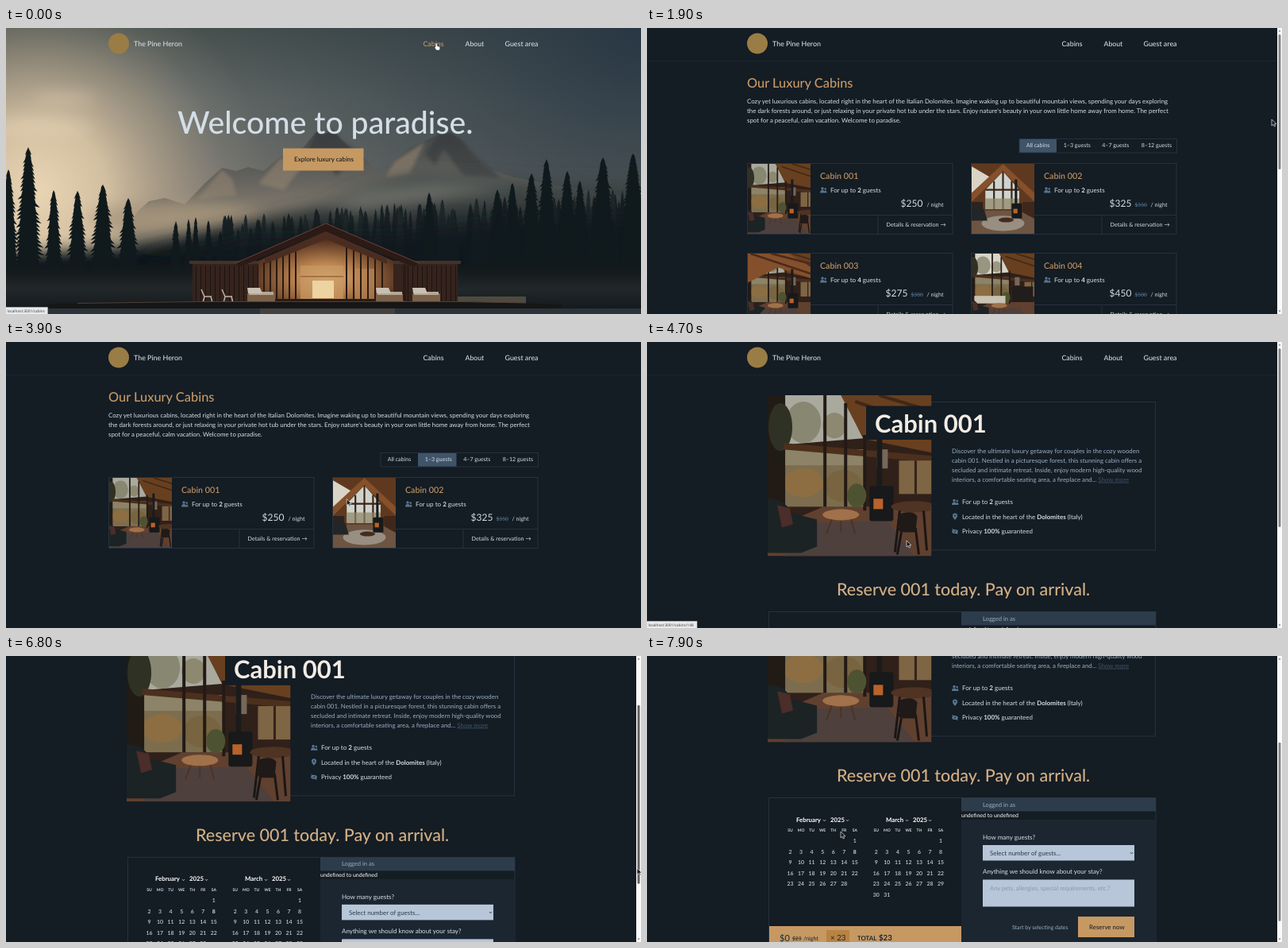
Recreate the animation shown at these times as an HTML page. Size 800 px wide and 360 px high, loop 8000 ms.

```html
<!DOCTYPE html>
<html lang="en">
<head>
<meta charset="utf-8">
<title>Cabin booking</title>
<style>
html, body { margin: 0; height: 100%; overflow: hidden; background: #141c24; }
svg { display: block; width: 100vw; height: 100vh; font-family: Lato, "Open Sans", sans-serif; }
text { text-rendering: geometricPrecision; white-space: pre; }
.m { font-weight: 500; }
.b { font-weight: 700; }
.mid { text-anchor: middle; }
.s { text-decoration: line-through; }
</style>
</head>
<body>
<svg id="stage" viewBox="0 0 800 360"></svg>
<script>
const PAGE = '#141c24', LINE = '#25323e', PANEL = '#1b2631', BAR = '#2d3c4b', SLATE = '#3f5468',
  TEXT = '#d4dee7', MUTED = '#99afc3', GOLD = '#c69963', SAND = '#d2af84', OCHRE = '#b78343';

// y is the middle of the capitals
const text = (x, y, size, str, fill = TEXT, cls = '') =>
  `<text x="${x}" y="${y + size * .34}" font-size="${size}" fill="${fill}" class="${cls}">${str}</text>`;
const rect = (x, y, w, h, fill, more = '') =>
  `<rect x="${x}" y="${y}" width="${w}" height="${h}" fill="${fill}" ${more}/>`;
const frame = (x, y, w, h) => rect(x, y, w, h, 'none', `stroke="${LINE}"`);
const shape = (d, fill, more = '') => `<path d="${d}" fill="${fill}" ${more}/>`;
const line = (d, color, w = 1) => shape(d, 'none', `stroke="${color}" stroke-width="${w}"`);
const oval = (x, y, rx, ry, fill, more = '') =>
  `<ellipse cx="${x}" cy="${y}" rx="${rx}" ry="${ry}" fill="${fill}" ${more}/>`;
const group = (id, body) => `<g id="${id}">${body}</g>`;
const list = (n, f) => Array.from({ length: n }, (_, i) => f(i)).join('');
const gradient = (id, stops, kind = 'linear', more = 'x2="0" y2="1"') =>
  `<${kind}Gradient id="${id}" ${more}>` +
  stops.map(([o, c, a = 1]) => `<stop offset="${o}" stop-color="${c}" stop-opacity="${a}"/>`).join('') +
  `</${kind}Gradient>`;
const blur = (id, r) => `<filter id="${id}" filterUnits="userSpaceOnUse" x="-60" y="-60" width="920" height="480">` +
  `<feGaussianBlur stdDeviation="${r}"/></filter>`;
const SOFT = 'filter="url(#soft)"', HAZY = 'filter="url(#hazy)"';

let seed = 7;
const rand = () => (seed = seed * 16807 % 2147483647) / 2147483647;

const defs = '<defs>' +
  gradient('sky', [[0, '#49524f'], [.25, '#666c69'], [.6, '#7f7b72'], [1, '#6b665d']]) +
  gradient('sun', [[0, '#e9d5b4'], [.3, '#dcc7a6', .9], [.6, '#bba88e', .5], [.82, '#a3978a', .15], [1, '#a3978a', 0]],
    'radial', 'gradientUnits="userSpaceOnUse" cx="40" cy="205" r="290"') +
  gradient('dusk', [[0, '#253443', .9], [.5, '#2c3a43', .5], [1, '#2c3a43', 0]], 'radial',
    'gradientUnits="userSpaceOnUse" cx="800" cy="0" r="620"') +
  gradient('rock', [[0, '#3f4445'], [.4, '#66645f'], [.7, '#8b8172'], [1, '#8b8172']]) +
  gradient('wood', [[0, '#454d4c', .85], [.35, '#252d2e', .95], [.6, '#10181b']]) +
  gradient('ground', [[0, '#11181a', 0], [.25, '#151b1d'], [.55, '#22282a'], [1, '#101619']]) +
  gradient('lamp', [[0, '#dfb47c'], [.45, '#b37e4c'], [1, '#543220']], 'radial', 'cy=".68" r=".55"') +
  blur('soft', 9) + blur('hazy', 2) + '</defs>';

function tree(x, top, base, w, fill) {
  const tiers = Math.round((base - top) / 5);
  let left = '', right = '';
  for (let i = 1; i <= tiers; i++) {
    const y = top + (base - top) * i / tiers, half = w / 2 * (i / tiers) ** .6;
    const out = () => half * (.7 + rand() * .4);
    right += `L${x + out()} ${y}L${x + half * .62} ${y - 1.5}`;
    left = `L${x - half * .62} ${y - 1.5}L${x - out()} ${y}` + left;
  }
  return shape(`M${x} ${top}${right}${left}Z`, fill);
}

function house() {
  const slat = x => rect(x, 299, 1, 45, '#1d1310');
  const post = x => { const y = 262 + Math.abs(x - 403) * .42; return rect(x, y, 2, 343 - y, '#2b1911'); };
  const lounger = x => rect(x, 334, 35, 10, '#7b6149') + rect(x + 2, 332, 31, 4, '#b5a896') +
    shape(`M${x} 327h16l3 7h-18z`, '#c9bfb2');
  const chair = x => line(`M${x} 329l4 9h9M${x + 4} 338l-2 8M${x + 12} 338l2 8`, '#b9b4ac', 1.5);
  return rect(235, 294, 95, 50, '#35231d') + rect(486, 294, 83, 50, '#35231d') +
    list(14, i => slat(239 + i * 6)) + list(11, i => slat(506 + i * 6)) +
    rect(231, 293, 100, 4, '#46302a') + rect(488, 293, 85, 4, '#46302a') +
    shape('M318 343V293L403 256 488 293V343Z', 'url(#lamp)') +
    rect(371, 299, 54, 43, '#c99962', 'opacity=".7"') + rect(386, 318, 27, 22, '#ecd3a2') +
    rect(371, 312, 54, 1.5, '#9a683d') + rect(440, 303, 24, 39, '#bd8a58', 'opacity=".6"') +
    list(6, i => post(324 + i * 8) + post(428 + i * 9)) +
    shape('M403 256L480 290V297L403 266 326 297V290Z', '#4a2d20') + rect(318, 341, 172, 3, '#2b1d16') +
    shape('M403 246L520 296 514 301 403 256 296 300 288 297Z', '#2b1a15') +
    line('M288 296.5L403 246 520 296', '#694436') +
    chair(246) + chair(272) + lounger(304) + lounger(466) + lounger(512) + rect(500, 298, 4, 45, '#2b1a15');
}

function landscape() {
  const big = [[28, 150, 44], [3, 178, 34], [60, 204, 30], [90, 205, 34], [122, 197, 42], [154, 214, 38],
    [214, 243, 20], [230, 240, 16], [239, 238, 16], [255, 242, 18], [270, 255, 17], [533, 207, 30],
    [619, 203, 32], [638, 195, 34], [662, 183, 40], [681, 165, 40], [707, 180, 38], [723, 192, 32],
    [752, 163, 50], [790, 158, 50]];
  const cover = fill => rect(0, 0, 800, 360, fill);
  return cover('url(#sky)') + cover('url(#dusk)') + cover('url(#sun)') +
    `<g ${SOFT} opacity=".4">` + oval(75, 88, 40, 6, '#ecd9bc') + oval(40, 125, 70, 9, '#ecd9bc') + '</g>' +
    shape('M150 262L165 232 180 218 200 214 225 222 250 196 272 176 290 180 305 175 325 180 345 162 375 150 392 130 400 134 412 128 422 140 435 152 447 158 470 185 490 165 510 150 528 142 545 134 560 132 575 142 590 160 610 178 640 188 680 196 800 215V290H150Z', 'url(#rock)') +
    `<g ${HAZY} opacity=".6">` +
    shape('M392 130L378 158 388 178 400 160 416 186 436 166 447 158 422 140 412 128 400 134ZM545 134L528 158 540 172 552 152 576 186 625 190 590 160 575 142 560 132Z', '#34393b') +
    shape('M345 164L318 196 350 204 372 176 375 152ZM272 178L240 216 290 210 285 190ZM528 143L490 168 478 188 508 184Z', '#93836f') + '</g>' +
    oval(215, 240, 110, 20, '#a8967d', SOFT + ' opacity=".8"') +
    shape('M0 360V285L150 275 215 262 330 236 400 222 450 200 520 182 600 186 680 192 860 190V360Z', 'url(#wood)', SOFT) +
    shape('M395 224L450 203 540 196 640 202 560 214 450 232Z', '#89877f', SOFT + ' opacity=".6"') +
    list(130, () => {
      const x = 275 + rand() * 525;
      return tree(x, 256 - (x - 275) * .07 - rand() * 22, 320, 15 + rand() * 10, rand() < .5 ? '#1e2729' : '#182023');
    }) +
    shape('M170 345V300L300 262 500 258 620 240 860 235V345Z', '#0f171a', SOFT + ' opacity=".75"') +
    big.map(([x, y, w]) => tree(x, y, 322, w, '#10191c')).join('') +
    rect(0, 290, 800, 70, 'url(#ground)') +
    shape('M560 338H655V346H570Z', '#4f4a40') + house() +
    shape('M60 347L240 344H570L700 348V353H40Z', '#161616') + line('M90 346.5L240 344.5H570L655 346', '#4d4038', 1) +
    rect(0, 353, 800, 7, '#2b343b') + rect(320, 353, 170, 7, '#5d5046', 'opacity=".5"');
}

// Interiors, drawn on a 206 by 202 field
function room(kind) {
  const rug = shape('M20 202L60 160 150 158 185 202Z', '#4d403d');
  const table = line('M82 152l-8 22M104 152l6 22M92 154v18', '#4f3222', 2) + oval(92, 150, 23, 7, '#a0714a');
  const sofa = shape('M0 130q22 0 30 18l32 8v34l-20 8H0z', '#1b2325') + shape('M12 138l16 4 4 20-14 4z', '#4b2d2a');
  const stove = rect(137, 45, 7, 70, '#1b1b1c') + rect(128, 114, 30, 44, '#17191a', 'rx="3"') + rect(133, 130, 12, 13, '#b9622a');
  if (kind == 1) return rect(0, 0, 206, 202, '#d9d4c6') +
    shape('M0 0H206V202H0V120L103 20 206 120Z', '#5f391f') + shape('M103 22L150 75V130H52V75Z', '#cfd3cd') +
    shape('M103 0L0 95V120L103 22 206 120V95Z', '#85502a') + line('M52 75H150M77 50V130M103 22V130M128 50V130', '#3c2416', 5) +
    rect(52, 100, 98, 30, '#8d8565', 'opacity=".7"') + rect(0, 110, 45, 60, '#2a2522') + rect(160, 110, 46, 55, '#3f271b') +
    shape('M0 202V165L55 135H150L206 165V202Z', '#6d5443') + oval(103, 172, 62, 22, '#988e81') + stove +
    shape('M10 130h38l10 34H6z', '#232628') + oval(112, 162, 22, 7, '#432c1f');
  const sky = kind == 3 ? '#d7d5c9' : '#aaa99e';
  const base = rect(0, 0, 206, 202, '#30201a') + shape('M0 202V170L70 140H206V202Z', '#60402f') +
    shape('M88 0H206V72L122 55Z', '#68401f') + line('M110 8L206 40M140 0L206 20', '#432817', 4) +
    shape('M22 0H92L120 54 22 62Z', sky) + rect(22, 68, 100, 72, '#7c6d4e') +
    `<g opacity=".65">` + oval(45, 34, 22, 26, '#77755c') + oval(84, 38, 15, 16, '#7f795a') +
    oval(45, 110, 25, 18, '#95703d') + oval(95, 114, 24, 20, '#77603a') + '</g>' +
    rect(22, 68, 100, 20, '#99957f', 'opacity=".55"') +
    rect(0, 0, 22, 140, '#211b16') + oval(16, 40, 15, 30, '#2f3124') + line('M20 64L206 80', '#4c2f1d', 8) +
    line('M72 0V140M98 10V140M122 50V145', '#231a16', 4) + rect(137, 68, 14, 24, '#766859') +
    rect(165, 82, 41, 42, '#7e6544') + line('M186 82V124', '#33241b', 3) + oval(112, 126, 12, 15, '#4d5332');
  if (kind == 2) return base + shape('M0 0H130L206 45V75L100 40 0 90Z', '#84502c') +
    line('M20 0L206 62M80 0L206 32', '#4b2b1b', 6) + stove + sofa + rug + table;
  if (kind == 3) return base + rug + rect(20, 122, 90, 22, '#c9c1b2') + shape('M130 95h60v45h-60z', '#211d1b') + sofa + table;
  return base + rug + stove + sofa + table + oval(184, 140, 29, 7, '#4f3323') +
    line('M166 145l-6 52M196 145l4 50M162 168h24l4 32M168 172l-5 28', '#1b1614', 3) + shape('M164 150q18-7 24 2l-2 20h-20z', '#1f1a18');
}
const photo = (kind, x, y, w, h) =>
  `<svg x="${x}" y="${y}" width="${w}" height="${h}" viewBox="0 0 206 202" preserveAspectRatio="xMidYMid slice">${room(kind)}</svg>`;

const people = (x, y) => shape(`M${x - 4} ${y + 3.5}q0-3.5 3-3.5t3 3.5zM${x + 1} ${y + 3.5}q1-4 3-2.5l.5 2.5z`, '#577592') +
  oval(x - 1, y - 2, 1.7, 1.7, '#577592') + oval(x + 2.7, y - 1.4, 1.3, 1.3, '#577592');
const upTo = n => `For up to <tspan class="b">${n}</tspan> guests`;

function card(i, x, y, price, old, guests) {
  return frame(x, y, 258.5, 89) + photo(i, x + .5, y + .5, 79, 88) +
    text(x + 91.5, y + 15.5, 10.7, 'Cabin 00' + (i + 1), GOLD, 'm') + people(x + 95.5, y + 33.5) +
    text(x + 104.5, y + 33.5, 8.05, upTo(guests)) +
    text(x + (old ? 174 : 193), y + 50, 12, '$' + price) +
    (old ? text(x + 206, y + 52, 6.6, '$' + old, '#577592', 's') : '') +
    text(x + 226, y + 52, 7.2, '/ night') +
    (i ? '' : rect(x + 165, y + 65, 93, 23.5, OCHRE, 'id="detailsHover"')) +
    line(`M${x + 79.5} ${y + 65}H${x + 258.5}M${x + 164.5} ${y + 65}V${y + 89}`, LINE) +
    `<g ${i ? '' : 'id="detailsText"'} fill="${TEXT}">` +
    text(x + 175, y + 77, 7.2, 'Details &amp; reservation →', 'inherit') + '</g>';
}

const edges = [469, 516, 564.5, 614, 667.5];
const cabins =
  text(126, 69.5, 16.4, 'Our Luxury Cabins', GOLD, 'm') +
  ['Cozy yet luxurious cabins, located right in the heart of the Italian Dolomites. Imagine waking up to beautiful mountain views, spending your days exploring',
   'the dark forests around, or just relaxing in your private hot tub under the stars. Enjoy nature\'s beauty in your own little home away from home. The perfect',
   'spot for a peaceful, calm vacation. Welcome to paradise.'].map((s, i) => text(126, 92.5 + i * 12, 7.9, s)).join('') +
  ['All cabins', '1–3 guests', '4–7 guests', '8–12 guests'].map((s, i) =>
    rect(edges[i], 139.5, edges[i + 1] - edges[i], 17.5, SLATE, `id="tab${i}"`) + text(edges[i] + 8.7, 148, 7.1, s)).join('') +
  frame(469, 139.5, 198.5, 17.5) +
  card(0, 126.5, 170.5, 250, 0, 2) + card(1, 408.5, 170.5, 325, 350, 2) +
  group('rest', card(2, 126.5, 283.5, 275, 300, 4) + card(3, 408.5, 283.5, 450, 500, 4));

const chevron = (x, y, color) => line(`M${x - 1.5} ${y - .7}l1.5 1.5 1.5-1.5`, color, .9);
function month(x, name, nameX, yearX, days, today) {
  const at = (col, y, size, s, cls) => text(x + col * 13.55, y, size, s, TEXT, 'mid ' + cls);
  return text(nameX, 367, 7.8, name, '#fff', 'b') + text(yearX, 367, 7.8, '2025', '#fff', 'b') +
    chevron(yearX - 7.5, 368, TEXT) + chevron(yearX + 21.5, 368, TEXT) +
    ['SU', 'MO', 'TU', 'WE', 'TH', 'FR', 'SA'].map((d, i) => at(i, 380.3, 5, d, 'b')).join('') +
    list(days, i => at((i + 6) % 7, 394 + Math.floor((i + 6) / 7) * 13.5, 6.9, i + 1, i + 1 == today ? 'b' : 'm'));
}

const detail =
  frame(152.5, 75.5, 488, 186.5) + photo(0, 152, 67, 206.5, 202.5) + rect(276, 80.5, 162, 42.5, PAGE) +
  text(287, 103.5, 31, 'Cabin 001', '#f1ebe3', 'b') +
  ['Discover the ultimate luxury getaway for couples in the cozy wooden',
   'cabin 001. Nestled in a picturesque forest, this stunning cabin offers a',
   'secluded and intimate retreat. Inside, enjoy modern high-quality wood',
   `interiors, a comfortable seating area, a fireplace and... <tspan fill="${SLATE}" text-decoration="underline">Show more</tspan>`]
    .map((s, i) => text(384, 137 + i * 12, 7.85, s, MUTED)).join('') +
  people(388, 201.5) + text(397, 201.5, 8.1, upTo(2)) +
  shape('M388 224q-3.4-4-3-5.5a3 3 0 0 1 6 0q.4 1.5-3 5.5z', '#577592') + oval(388, 218.6, 1, 1, PAGE) +
  text(397, 220, 7.95, 'Located in the heart of the <tspan class="b">Dolomites</tspan> (Italy)') +
  oval(388, 238.5, 3.8, 2.6, '#577592') + oval(388, 238.5, 1.3, 1.3, PAGE) + line('M384.5 235l7 7', '#8097ad', .9) +
  text(397, 238.5, 7.95, 'Privacy <tspan class="b">100%</tspan> guaranteed') +
  text(239, 312, 21.5, 'Reserve 001 today. Pay on arrival.', SAND, 'm') +
  frame(153.5, 339.5, 487.5, 190) + rect(396, 339.5, 245, 17, BAR) +
  text(423, 348, 7.6, 'Logged in as', MUTED) + text(396, 361.5, 7, 'undefined to undefined', '#fff') +
  rect(396, 367, 245, 163, PANEL) +
  month(180.5, 'February', 188, 231, 28, 8) + month(288.8, 'March', 301, 335, 31) +
  rect(154, 501, 242, 29, GOLD) + text(167, 516, 11, '$0', PANEL) + text(183, 516.5, 6.6, '$23', PANEL, 's') +
  text(197, 516.5, 7.2, '/night', PANEL) + rect(226, 506, 29, 20, OCHRE) + text(231, 516, 9.8, '× 23', PANEL) +
  text(265, 516, 7.8, 'TOTAL', PANEL, 'b') + text(292, 516, 9.7, '$23', PANEL, 'b') +
  text(423, 389.5, 8.05, 'How many guests?') + rect(423, 399, 191, 19.5, '#b7c6d8') +
  text(432, 409, 7.95, 'Select number of guests...', BAR) + chevron(610.5, 409, PAGE) +
  text(423, 432.5, 8, 'Anything we should know about your stay?') + rect(423, 442.5, 191, 34, '#b7c6d8') +
  text(432, 453.5, 7.6, 'Any pets, allergies, special requirements, etc.?', '#8799ad') +
  text(460, 502.5, 6.95, 'Start by selecting dates', MUTED) + rect(543, 489, 71, 26, GOLD) +
  text(557, 502, 7.9, 'Reserve now', PANEL, 'm');

const home = landscape() + text(216, 119.5, 39.2, 'Welcome to paradise.', TEXT, 'm') +
  rect(349, 151.5, 101.5, 28, GOLD) + text(363, 165.5, 8.05, 'Explore luxury cabins', PAGE, 'm');

const header = oval(139, 19.5, 13, 13, '#9a7d45') + text(158, 20, 8.9, 'The Pine Heron', TEXT, 'm') +
  `<g id="navCabins">${text(522.5, 20, 8.8, 'Cabins', 'inherit', 'm')}</g>` +
  text(575.5, 20, 8.7, 'About', TEXT, 'm') + text(625.5, 20, 8.9, 'Guest area', TEXT, 'm');

const stage = document.getElementById('stage');
stage.innerHTML = defs + rect(0, 0, 800, 360, PAGE) + group('home', home) +
  group('cabins', cabins) + group('detail', detail) +
  group('rule', rect(0, 41, 800, 1, PANEL)) + group('header', header) +
  group('bar', rect(794, 0, 6, 360, '#fafafa') + shape('M795.5 4.5l1.5-2 1.5 2zM795.5 355.5l1.5 2 1.5-2z', '#777') +
    rect(795.5, 8, 3, 170, '#858585', 'rx="1.5" id="thumb"')) +
  group('status', rect(-1, 351.5, 10, 10, '#e9eaec', 'stroke="#b5b8bb" stroke-width=".5" id="statusBox"') +
    '<text id="statusText" x="1.5" y="358" font-size="4.7" fill="#333" font-family="Open Sans, Noto Sans, sans-serif"></text>') +
  shape('M0 0V8L2 6.3 3.3 9 4.6 8.4 3.4 5.8H6Z', '#14181c', 'stroke="#e4e4e4" stroke-width=".7" id="arrow"') +
  shape('M0 0q1 0 1 1v2.6l3 .8q1 .3.8 1.5l-.6 3h-4l-2.2-3.2q-.2-1 1-.6V1q0-1 1-1z', '#fff', 'stroke="#222" stroke-width=".4" id="hand"');

const el = id => document.getElementById(id);
const show = (id, on) => el(id).setAttribute('display', on ? 'inline' : 'none');
const move = (id, x, y) => el(id).setAttribute('transform', `translate(${x} ${y})`);

const OPEN_LIST = 1300, FILTER = 3500, OPEN_CABIN = 4600;
const pointer = [[0, 542, 19], [1250, 542, 19], [1900, 787, 115], [2350, 787, 115], [2950, 532, 145], [3550, 532, 145],
  [4250, 327, 250], [5500, 327, 250], [6350, 796, 213], [6400, 796, 213], [6800, 795, 267], [7300, 796, 314],
  [7400, 796, 314], [7900, 244, 221], [8000, 244, 221]];
const scrolling = [[0, 0], [6400, 0], [6800, 86], [7300, 161], [8000, 161]];

function along(keys, t) {
  const i = keys.findIndex(k => k[0] > t), a = keys[i - 1], b = keys[i], u = (t - a[0]) / (b[0] - a[0]);
  return a.slice(1).map((v, j) => v + (b[j + 1] - v) * u);
}

function draw(t) {
  const onHome = t < OPEN_LIST, onCabin = t >= OPEN_CABIN, onList = !onHome && !onCabin, filtered = t >= FILTER;
  const wide = onHome || (onList && filtered), shift = wide ? 3 : 0;
  const [x, y] = along(pointer, t), [scroll] = along(scrolling, t);
  show('home', onHome); show('cabins', onList); show('detail', onCabin);
  show('rule', !onHome); show('rest', !filtered); show('bar', !wide);
  move('cabins', shift, 0); move('detail', 0, -scroll);
  move('header', shift, -scroll); move('rule', 0, -scroll);
  el('navCabins').setAttribute('fill', onHome ? GOLD : TEXT);

  const px = x - shift;
  const overTab = onList && y > 139 && y < 157 ? edges.findIndex((e, i) => px >= e && px < edges[i + 1]) : -1;
  for (let i = 0; i < 4; i++) show('tab' + i, i == overTab || i == +filtered);
  const overDetails = onList && px > 291 && px < 385 && y > 236 && y < 259;
  show('detailsHover', overDetails);
  el('detailsText').setAttribute('fill', overDetails ? PANEL : TEXT);

  el('thumb').setAttribute('y', 8 + scroll * .625);
  el('thumb').setAttribute('height', onCabin ? 225 : 170);
  el('thumb').setAttribute('fill', t > 6400 && t < 7400 ? '#606060' : '#858585');

  const toCabin = overDetails || (onCabin && t < 4900);
  show('status', onHome || toCabin);
  el('statusBox').setAttribute('width', toCabin ? 64 : 53.5);
  el('statusText').textContent = 'localhost:3001/cabins' + (toCabin ? '/148' : '');

  const link = onHome || overTab >= 0 || overDetails;
  show('hand', link); show('arrow', !link);
  move(link ? 'hand' : 'arrow', x, y);
}

const start = performance.now();
(function tick() {
  draw((performance.now() - start) % 8000);
  requestAnimationFrame(tick);
})();
</script>
</body>
</html>
```
